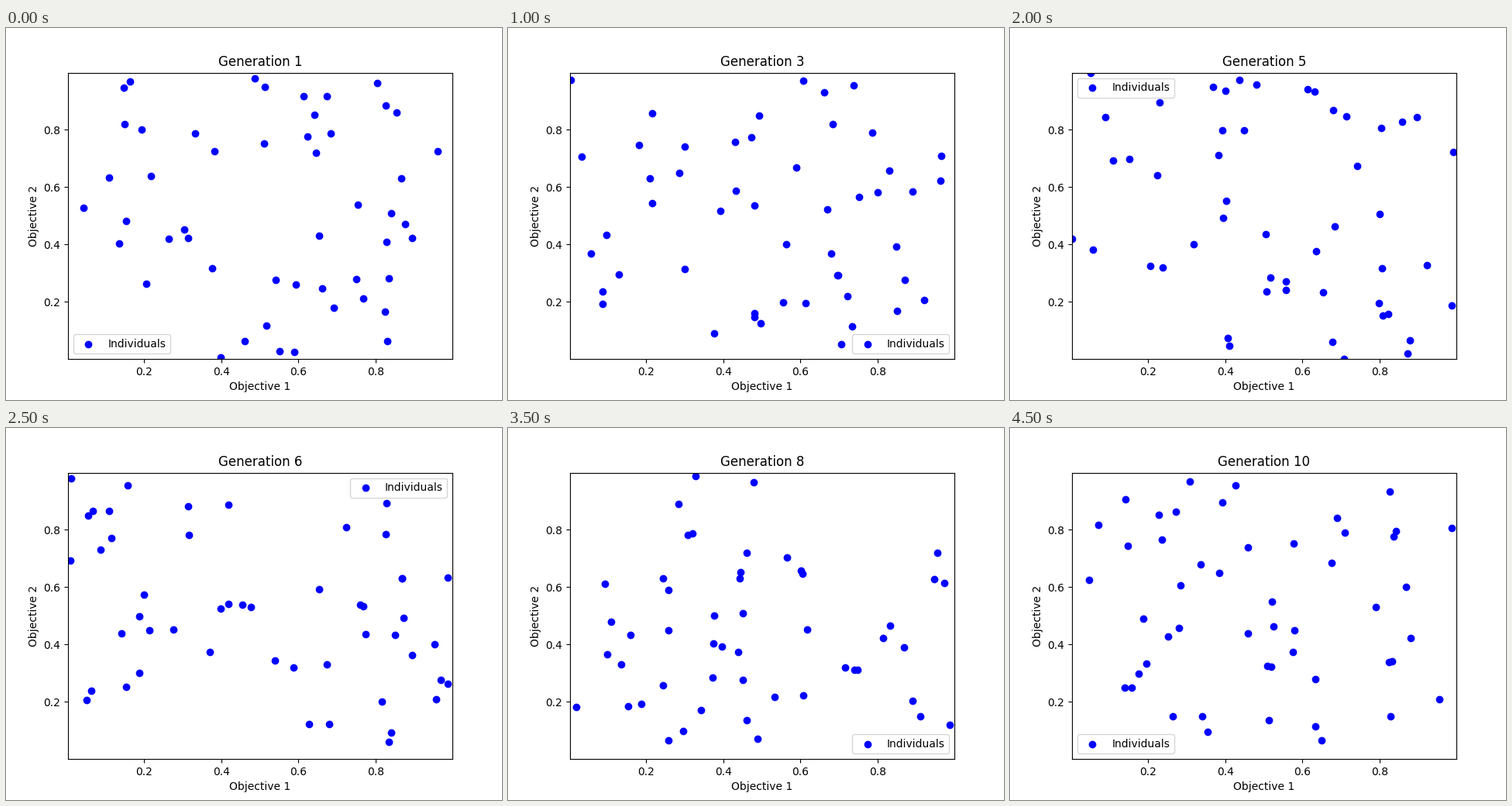
A matplotlib script for the animation above (5 s loop, 640x480 px).

```python
import numpy as np
import matplotlib.pyplot as plt
from matplotlib.animation import FuncAnimation

SIZE = 50
LOW, HIGH = (0.0025, 0.0007), (0.999, 0.9985)

# Legend place in each generation
SPOTS = ["lower left", "upper right", "lower right", "center left",
         "upper left", "upper right", "upper left", "lower right",
         "center left", "lower left"]
ROW_Y = {"upper": 0.945, "center": 0.5, "lower": 0.055}
SIDE_X = {"left": 0.14, "right": 0.86}


def population(gen, spot):
    """Uniform random individuals that keep clear of the legend."""
    rng = np.random.default_rng(gen)
    row, side = spot.split()
    points = rng.uniform(LOW, HIGH, (2 * SIZE, 2))
    gap = np.abs(points - (SIDE_X[side], ROW_Y[row]))
    hidden = (gap < (0.145, 0.05)).all(axis=1)
    return points[~hidden][:SIZE]


populations = [population(g, s) for g, s in enumerate(SPOTS, 1)]
ticks = np.linspace(0.2, 0.8, 4)

fig, ax = plt.subplots(figsize=(6.4, 4.8), dpi=100)
dots = ax.scatter(*populations[0].T, color="blue", label="Individuals")
ax.set(xlim=(LOW[0], HIGH[0]), ylim=(LOW[1], HIGH[1]),
       xticks=ticks, yticks=ticks,
       xlabel="Objective 1", ylabel="Objective 2")


def update(i):
    dots.set_offsets(populations[i])
    ax.set_title(f"Generation {i + 1}")
    ax.legend(loc=SPOTS[i])
    return [dots]


anim = FuncAnimation(fig, update, frames=len(SPOTS), interval=500,
                     repeat=True, repeat_delay=0)
plt.show()
```
